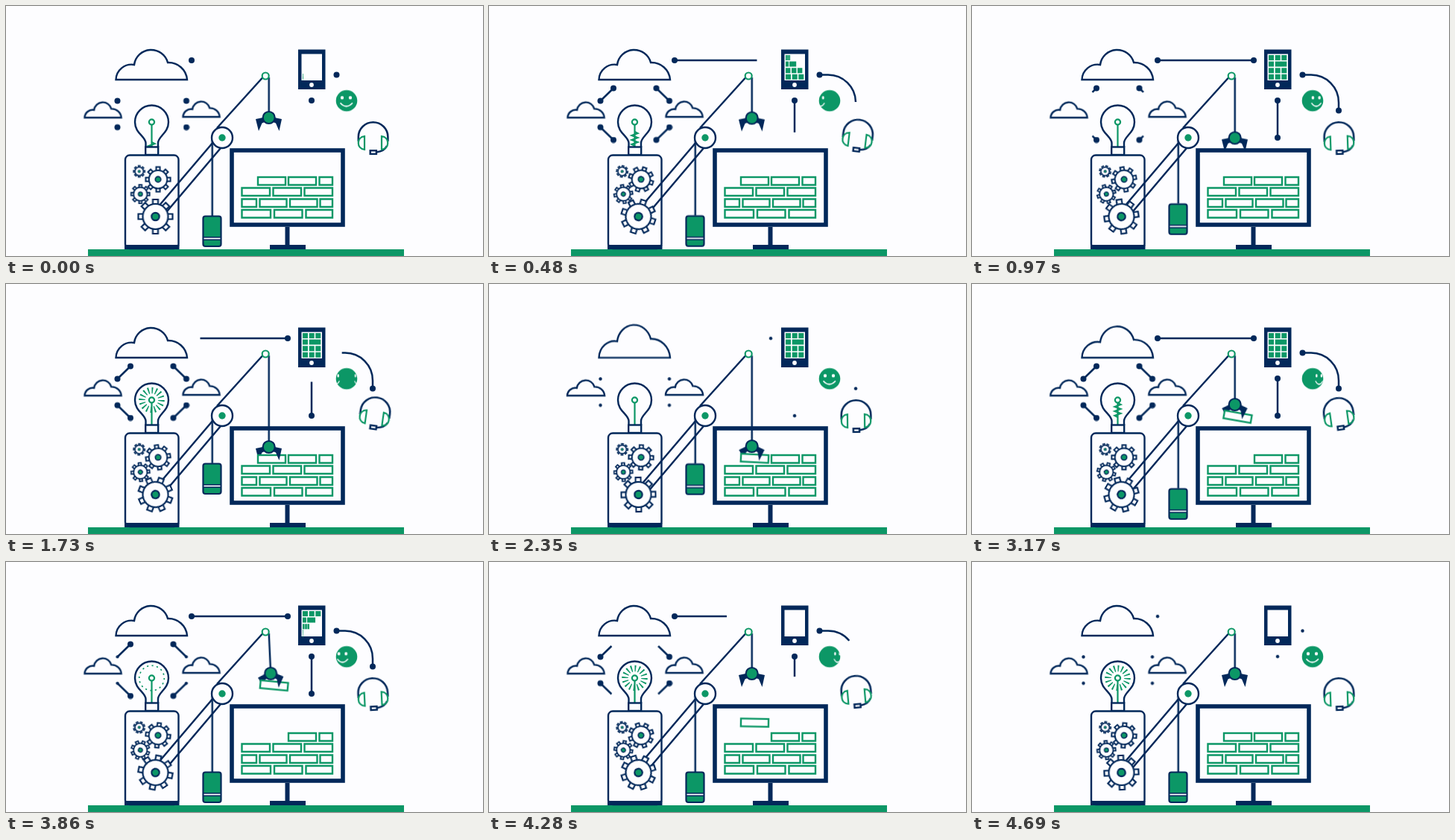
Write an HTML page without scripts that moves like this. It is 640x336 px and loops after 4.76 s.

```html
<!DOCTYPE html>
<html lang="en">
<head>
<meta charset="utf-8">
<title>Idea machine</title>
<style>
  :root { --navy: #02285a; --green: #0c9766; --paper: #fdfdff; --loop: 4760ms; --half: 2380ms; --beat: 1190ms; }
  html, body { margin: 0; height: 100%; overflow: hidden; background: var(--paper); }
  svg { display: block; width: 100%; height: 100%; }

  .line { fill: none; stroke: var(--navy); stroke-width: 2.5; }
  .body { fill: var(--paper); stroke: var(--navy); stroke-width: var(--weight, 2.4); }
  .core { fill: var(--green); stroke: var(--navy); stroke-width: 2.2; }
  .trim { fill: none; stroke: var(--green); stroke-width: 2.2; }
  .navy { fill: var(--navy); }
  .green { fill: var(--green); }
  .paper { fill: var(--paper); }
  .disc, .tooth, .cloud { vector-effect: non-scaling-stroke; }
  .brick { fill: var(--paper); stroke: var(--green); stroke-width: 2.4; }

  /* Crane */
  .lift { animation: lift var(--loop) infinite; }
  @keyframes lift {
    0%, 8.4%, 74.6%, 100% { transform: none; animation-timing-function: ease-in-out; }
    35.7%, 47.06% { transform: var(--low); animation-timing-function: ease-in-out; }
  }
  .swing { transform-origin: 350px 95px; animation: swing var(--loop) ease-in-out infinite; }
  @keyframes swing { 0%, 74.6%, 86%, 100% { transform: none; } 81.1% { transform: rotate(-2.6deg); } }
  .carry { animation: carry var(--loop) infinite; }
  @keyframes carry {
    0%, 47.06%, 91%, 100% { transform: none; animation-timing-function: ease-in-out; }
    74.6% { transform: translateY(-69px); }
    85.1% { transform: translateY(-69px); animation-timing-function: ease-in; }
  }
  .tilt { transform-origin: 356px 235px; animation: tilt var(--loop) linear infinite; }
  @keyframes tilt {
    0%, 47.06%, 91%, 100% { transform: none; }
    49.4% { transform: rotate(3deg); }
    61% { transform: rotate(9deg); }
    66.6% { transform: rotate(10deg); }
    81.1% { transform: rotate(8deg); }
    85.1% { transform: rotate(6deg); }
  }
  .claw { transform-origin: var(--pin) 152px; animation: grip var(--loop) ease-in-out infinite; }
  @keyframes grip {
    0%, 36%, 85.7%, 100% { transform: none; }
    46.2%, 83.8% { transform: rotate(var(--grip)); }
  }
  .spin { animation: spin var(--loop) linear infinite; }
  @keyframes spin { to { transform: rotate(var(--turn)); } }

  /* Connections */
  .flow, .link { stroke-dasharray: 1 2; }
  .flow { animation: flow var(--loop) linear infinite; }
  @keyframes flow {
    0%, 95.2%, 100% { stroke-dashoffset: 1; }
    11.8%, 35.5%, 61.8%, 85.5% { stroke-dashoffset: 0; }
    45.2%, 50.4% { stroke-dashoffset: -1; }
  }
  .link { animation: link var(--half) linear infinite; }
  @keyframes link {
    0%, 92.4%, 100% { stroke-dashoffset: 1; }
    12.6%, 34.5%, 60.5%, 77.7% { stroke-dashoffset: 0; }
    43.7%, 50% { stroke-dashoffset: -1; }
  }
  .dot { fill: var(--navy); transform-box: fill-box; transform-origin: center; animation: dot var(--loop) linear infinite; }
  .end { animation-delay: calc(0ms - var(--half)); }
  @keyframes dot {
    0%, 34.5%, 62.6%, 95.2%, 100% { transform: scale(1); }
    35.7%, 60.9% { transform: scale(0); }
    97.9%, 99.4% { transform: scale(.55); }
  }
  .outer { animation: outer var(--half) linear infinite; }
  @keyframes outer {
    0%, 33.6%, 63.9%, 92.4%, 100% { transform: scale(1); }
    35.7%, 60.5% { transform: scale(0); }
    96.2%, 98.8% { transform: scale(.55); }
  }
  .inner { animation: inner var(--half) linear infinite; }
  @keyframes inner {
    0%, 10.9%, 79.8%, 100% { transform: scale(0); }
    14.3%, 44.5%, 50%, 77.3% { transform: scale(1); }
    46.6%, 48.7% { transform: scale(.55); }
  }

  /* Bulb */
  .coil { animation: coil var(--half) linear infinite; }
  @keyframes coil {
    0% { transform: translateY(23px); }
    33.2% { transform: none; }
    40%, 99.9% { transform: translateY(-21px); }
  }
  .rays { stroke-dasharray: 1 2; animation: rays var(--half) linear infinite; }
  @keyframes rays {
    0%, 60.5% { r: 17px; stroke-width: 0; }
    62.2% { r: 16.8px; stroke-width: 1.6px; }
    70%, 97.4% { r: 13px; stroke-width: 8.5px; }
    98%, 100% { r: 17px; stroke-width: 0; }
  }

  /* Sky and devices */
  .puff { transform-origin: 195px 99px; animation: puff var(--loop) ease-in-out infinite; }
  @keyframes puff { 0%, 36.3%, 81%, 100% { transform: none; } 49.4% { transform: scaleY(1.1); } 66.6% { transform: scaleY(1.05); } }
  .small { animation-name: puff-small; }
  @keyframes puff-small { 0%, 36.3%, 81%, 100% { transform: none; } 49.4% { transform: scaleX(1.02); } }

  .row { transform-origin: 398px 0; animation: row var(--loop) linear infinite; animation-delay: calc(133ms * var(--i) - 4780ms); }
  @keyframes row { 0%, 81.85%, 100% { transform: scaleX(0); } 8.4%, 73.45% { transform: scaleX(1); } }

  .leave, .enter { animation: leave var(--beat) linear infinite; }
  .enter { animation-name: enter; }
  @keyframes leave {
    0% { transform: none; }
    24% { transform: translateX(-5px) scaleX(.88); }
    45% { transform: translateX(-14px) scaleX(.6); }
    60%, 100% { transform: translateX(-26px) scaleX(.4); }
  }
  @keyframes enter {
    0%, 30% { transform: translateX(26px) scaleX(.4); }
    45% { transform: translateX(15px) scaleX(.5); }
    66% { transform: translateX(9px) scaleX(.6); }
    82% { transform: translateX(5px) scaleX(.8); }
    94%, 100% { transform: none; }
  }
  .wobble { transform-origin: 492px 182px; animation: wobble var(--beat) ease-in-out infinite; }
  @keyframes wobble {
    0%, 100% { transform: none; }
    25% { transform: rotate(-3deg); }
    45% { transform: translate(2px, -4px) rotate(8deg); }
    66% { transform: translate(0, -3px) rotate(-8deg); }
    82%, 94% { transform: rotate(-2deg); }
  }
</style>
</head>
<body>
<svg viewBox="0 0 640 336">
  <defs>
    <path id="cloud" class="body cloud" d="M147.5 99A21 21 0 0 1 172 79A23 23 0 0 1 217 76A25 25 0 0 1 243 99Z"/>
    <path id="wire" pathLength="1" d="M149.5 127.5L167 110.5"/>
    <circle id="outer" cx="149.5" cy="127.5" r="4"/>
    <circle id="inner" cx="167" cy="110.5" r="4"/>
    <rect id="tooth" class="tooth" x="-3.5" y="-23" width="7" height="9"/>
    <g id="teeth"><use href="#tooth"/><use href="#tooth" transform="rotate(90)"/><use href="#tooth" transform="rotate(180)"/><use href="#tooth" transform="rotate(270)"/></g>
    <g id="gear" class="body">
      <use href="#teeth"/><use href="#teeth" transform="rotate(45)"/>
      <circle class="disc" r="17"/>
      <circle class="core" r="5.2"/>
    </g>
    <g id="face">
      <circle class="paper" cx="-6" cy="-4" r="2.2"/>
      <circle class="paper" cx="5" cy="-4" r="2.2"/>
      <path d="M-8.5 3Q-.5 12 8 3" fill="none" stroke="#fdfdff" stroke-width="1.8"/>
    </g>
    <clipPath id="head"><circle r="14.3"/></clipPath>
    <clipPath id="stem"><path d="M186 160h20v29h-20z"/></clipPath>
  </defs>

  <rect class="green" x="110" y="327" width="424" height="9"/>

  <!-- Clouds -->
  <use class="puff" href="#cloud"/>
  <g transform="translate(29.5 99) scale(.515)"><use class="puff small" href="#cloud"/></g>
  <g transform="translate(161.5 98) scale(.515)"><use class="puff small" href="#cloud"/></g>

  <!-- Connections -->
  <g>
    <use class="line link" href="#wire"/><use class="dot outer" href="#outer"/><use class="dot inner" href="#inner"/>
  </g>
  <g transform="translate(391.5) scale(-1 1)">
    <use class="line link" href="#wire"/><use class="dot outer" href="#outer"/><use class="dot inner" href="#inner"/>
  </g>
  <g transform="translate(0 290.5) scale(1 -1)">
    <use class="line link" href="#wire"/><use class="dot outer" href="#outer"/><use class="dot inner" href="#inner"/>
  </g>
  <g transform="translate(391.5 290.5) scale(-1)">
    <use class="line link" href="#wire"/><use class="dot outer" href="#outer"/><use class="dot inner" href="#inner"/>
  </g>
  <path class="line flow" pathLength="1" d="M249 73H378"/>
  <circle class="dot" cx="249" cy="73" r="4"/><circle class="dot end" cx="378" cy="73" r="4"/>
  <path class="line flow" pathLength="1" d="M410 127V177"/>
  <circle class="dot" cx="410" cy="127" r="4"/><circle class="dot end" cx="410" cy="177" r="4"/>
  <path class="line flow" pathLength="1" d="M443.5 92.5H455A37 37 0 0 1 492 130V140.5"/>
  <circle class="dot" cx="443.5" cy="92.5" r="4"/><circle class="dot end" cx="492" cy="140.5" r="4"/>

  <!-- Bulb -->
  <path class="body" d="M187.5 190V184C187 175 173 171 173 156A22.5 22.5 0 0 1 218 156C218 171 204 175 204 184V190"/>
  <circle class="trim rays" cx="195.5" cy="156" r="17" pathLength="48"/>
  <path class="trim" d="M195.5 160V189"/>
  <g clip-path="url(#stem)"><path class="trim coil" d="M195.5 160l4 2-8 3 8 3-8 3 8 3-8 3 4 2"/></g>
  <circle class="trim" cx="195.5" cy="156" r="3.6"/>
  <rect class="body" x="187.2" y="189.5" width="17" height="10.5"/>

  <!-- Machine -->
  <rect class="body" x="160" y="200.5" width="71.5" height="125.5" rx="6"/>
  <rect class="navy" x="159" y="321" width="73.5" height="6"/>
  <g transform="translate(178.7 222.3) scale(.33)" style="--turn:-360deg;--weight:1.5"><use class="spin" href="#gear"/></g>
  <g transform="translate(180.3 252.8) scale(.54)" style="--turn:360deg;--weight:1.8"><use class="spin" href="#gear"/></g>
  <g transform="translate(204 233) scale(.72)" style="--turn:-270deg;--weight:2"><use class="spin" href="#gear"/></g>

  <!-- Crane arm and counterweight -->
  <path class="line" d="M207 266.5L278 183M216 276L288 191M283 164L344 96.5"/>
  <g transform="translate(200.5 283)" style="--turn:180deg;--weight:2.2"><use class="spin" href="#gear"/></g>
  <g transform="translate(276.7 180)"><path class="line lift" style="--low:scaleY(.598)" d="M0 0V102"/></g>
  <g class="lift" style="--low:translateY(-41px)">
    <rect class="core" x="264.5" y="282.5" width="24" height="40.5" rx="3"/>
    <path class="line" d="M264 312.5H289" style="stroke-width:5"/>
    <path d="M265.5 312.5H287.5" stroke="#fdfdff" stroke-width="1.8"/>
  </g>
  <circle class="body" cx="290" cy="177" r="14"/>
  <circle class="green" cx="290" cy="177" r="4.7"/>

  <!-- Monitor -->
  <rect class="line" x="303" y="194" width="149" height="100" style="fill:var(--paper);stroke-width:5.6"/>
  <path class="navy" d="M374.5 297h6v24h21.5v6h-48v-6h20.5z"/>
  <g class="brick">
    <path d="M379 230h37v10.5h-37zM420.5 230h17.5v10.5h-17.5z"/>
    <path d="M316.5 244.5h37.5v10.5h-37.5zM358.5 244.5h37.5v10.5h-37.5zM400.5 244.5h37.5v10.5h-37.5z"/>
    <path d="M316.5 259.5h19.5v10.5h-19.5zM340.5 259.5h36v10.5h-36zM381 259.5h36.5v10.5h-36.5zM421.5 259.5h16.5v10.5h-16.5z"/>
    <path d="M316.5 274h38.5v10.5h-38.5zM360 274h37.5v10.5h-37.5zM402.5 274h35.5v10.5h-35.5z"/>
  </g>

  <!-- Grabber -->
  <g class="swing">
    <g transform="translate(352.7 96)"><path class="line lift" style="--low:scaleY(2.38)" d="M0 0V50"/></g>
    <g class="lift" style="--low:translateY(69px)">
      <path class="navy claw" style="--pin:347px;--grip:-14deg" d="M347 149.5L335 152L339 168L343.5 157.5L348 155.5Z"/>
    </g>
    <g class="carry"><rect class="brick tilt" x="338" y="230" width="37" height="10.5"/></g>
    <g class="lift" style="--low:translateY(69px)">
      <path class="navy claw" style="--pin:358px;--grip:14deg" d="M358 149.5L370 152L366.5 168L362 157.5L357 155.5Z"/>
      <circle class="core" cx="352.7" cy="150" r="8"/>
    </g>
  </g>
  <circle class="trim" cx="348.2" cy="94" r="4.5" style="fill:var(--paper)"/>

  <!-- Phone -->
  <rect class="navy" x="392" y="58.5" width="36.5" height="53.5"/>
  <rect class="paper" x="396.5" y="64.5" width="27.5" height="35.5"/>
  <circle class="paper" cx="410" cy="106" r="2.9"/>
  <g class="green">
    <path class="row" style="--i:3" d="M398 66h7v7h-7zM406.7 66h7v7h-7zM415.3 66h7v7h-7z"/>
    <path class="row" style="--i:2" d="M398 74.6h7v7h-7zM406.7 74.6h15.6v7h-15.6z"/>
    <path class="row" style="--i:1" d="M398 83.2h7v7h-7zM406.7 83.2h7v7h-7zM415.3 83.2h7v7h-7z"/>
    <path class="row" style="--i:0" d="M398 91.8h7v7h-7zM406.7 91.8h7v7h-7zM415.3 91.8h7v7h-7z"/>
  </g>

  <!-- Smiley -->
  <g transform="translate(457 127.3)">
    <circle class="green" r="14.3"/>
    <g clip-path="url(#head)"><use class="leave" href="#face"/><use class="enter" href="#face"/></g>
  </g>

  <!-- Headset -->
  <g class="wobble">
    <path class="line" d="M472.8 182V176A19.8 19.8 0 0 1 512.4 176V182M511 188Q508 195 497 196.5"/>
    <path class="trim" d="M481 175V193C470 192 470 176 481 175ZM504 175V193C515 192 515 176 504 175Z"/>
    <rect class="body" x="488.7" y="194.3" width="8.2" height="4.6"/>
  </g>
</svg>
</body>
</html>
```
